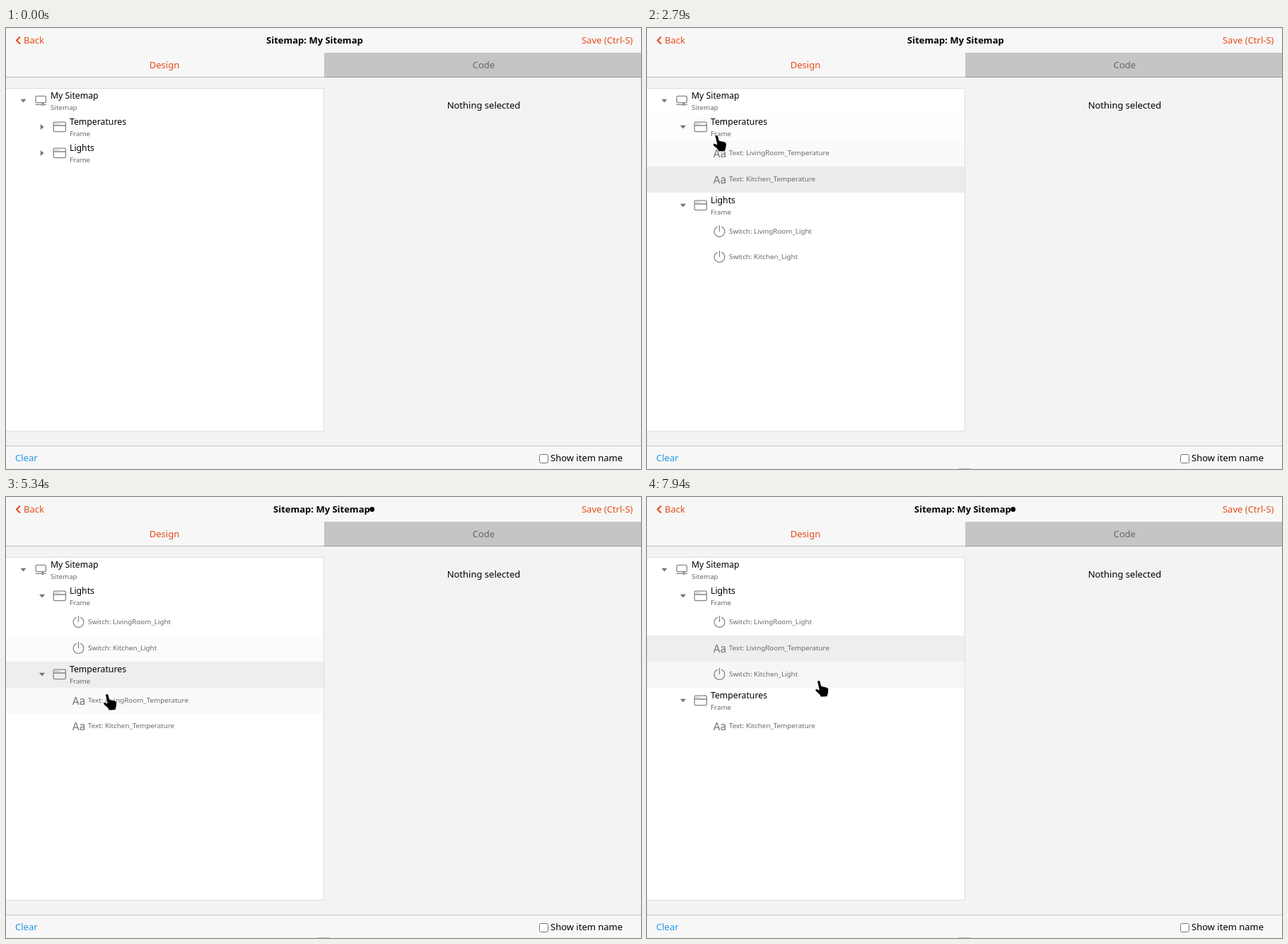
Animation, 898 px wide and 624 px high, one loop 7990 ms. Source, as an HTML page:

```html
<!DOCTYPE html>
<html lang="en">
<head>
<meta charset="utf-8">
<title>Sitemap editor</title>
<style>
html, body { margin: 0; width: 100%; height: 100%; overflow: hidden; background: #f3f3f3; }
svg { display: block; }
text { font: 13px "Noto Sans", "Open Sans", sans-serif; }
.name { font-size: 12.25px; }
.sub { font-size: 9.8px; fill: #6a6a6a; }
.aa { font: 15px Inter, Roboto, sans-serif; fill: #777; }
.bold { font-weight: 600; }
.accent { fill: #e64a19; }
.icon { fill: none; stroke: #858585; stroke-width: 1.3; stroke-linecap: round; }
.caret { fill: #737373; }
</style>
</head>
<body>
<svg width="898" height="624" viewBox="0 0 898 624">
  <rect width="898" height="624" fill="#f3f3f3"/>
  <rect width="898" height="70" fill="#f7f7f7"/>
  <rect x="450" y="35" width="448" height="35" fill="#c5c5c5"/>
  <rect y="69" width="450" height="1" fill="#bdbdbd"/>
  <rect x="450" y="69" width="448" height="1" fill="#969696"/>
  <path d="M20 12.5l-5 5 5 5" fill="none" stroke="#e64a19" stroke-width="2.1"/>
  <text class="accent" x="25" y="22">Back</text>
  <text class="bold" id="title" x="368" y="22">Sitemap: My Sitemap</text>
  <circle id="dirty" cx="517.7" cy="17.5" r="3.4"/>
  <text class="accent" x="886.5" y="22" text-anchor="end">Save (Ctrl-S)</text>
  <text class="accent" x="224" y="57" text-anchor="middle">Design</text>
  <text x="675.5" y="57" text-anchor="middle" fill="#666">Code</text>
  <text x="675.5" y="114" text-anchor="middle">Nothing selected</text>
  <path d="M0 85.5H449.5V570.5H0" fill="#fff" stroke="#dedede"/>
  <rect y="591" width="898" height="33" fill="#f7f7f7"/>
  <rect y="591" width="898" height="1" fill="#c6c6c6"/>
  <text x="13" y="613" fill="#2196e8">Clear</text>
  <rect x="754.5" y="603.5" width="12" height="12" rx="2" fill="#fff" stroke="#767676"/>
  <text x="770" y="613">Show item name</text>
  <rect id="grip" x="440" y="623" width="18" height="1" fill="#c0c0c0"/>

  <g transform="translate(0 85)">
    <path class="caret" d="M20.5 15.8h8l-4 4.7z"/>
    <g class="icon">
      <rect x="42" y="11.3" width="14.4" height="9.4" rx="1.6"/>
      <path d="M42 23.3H50M54 23.3H56.5M52 21V22"/>
      <circle cx="52" cy="23.3" r="1.3"/>
    </g>
    <text class="name" x="63" y="15">My Sitemap</text>
    <text class="sub" x="63" y="30.5">Sitemap</text>
  </g>
  <g id="hovers"></g>
  <g id="rows"></g>
  <g id="ghosts" opacity=".75"></g>
  <path id="hand" stroke="#fff" stroke-width=".8" d="M-2.2 1.6C-2.3-.5 1.3-.8 2 1.3L3.6 7.4 11 9.2Q13.9 10 13.8 13L13.2 18Q12.3 20 12 22.6L2.5 23 1.5 20-4.6 14.6Q-6 12-3.5 11.4L.4 13Z"/>
  <g id="noDrop">
    <circle r="9" fill="#fff" stroke="#d40a0a" stroke-width="2.2"/>
    <path d="M-6.8 4.6L6.8-4.6" stroke="#d40a0a" stroke-width="2.6"/>
  </g>
</svg>
<script>
const LOOP = 7990, TOP = 122.3, PITCH = 36.83, FADE = 270, SWAP = 160;
const $ = id => document.getElementById(id);
const show = (el, on) => el.style.display = on ? '' : 'none';
const move = (el, x, y) => el.setAttribute('transform', `translate(${x} ${y})`);

const items = {
  T: ['frame', 'Temperatures'],
  a: ['text', 'Text: LivingRoom_Temperature'],
  b: ['text', 'Text: Kitchen_Temperature'],
  L: ['frame', 'Lights'],
  c: ['switch', 'Switch: LivingRoom_Light'],
  d: ['switch', 'Switch: Kitchen_Light']
};
const ids = Object.keys(items);

// [start, row order, slides into place]
const layouts = [
  [0, 'TL'], [1200, 'TabL'], [1850, 'TabLcd'],
  [3700, 'LcdTab', true], [6480, 'LcadTb', true]
];

// Pointer path: [time, x, y]
const path = [
  [60, 449, 612], [500, 210, 330], [900, 45, 137], [1350, 45, 137],
  [1700, 47, 248], [2310, 47, 248], [2510, 62, 234], [2720, 80, 198],
  [2790, 98.5, 152], [2900, 102, 138], [3010, 102, 140], [3320, 95.5, 251],
  [3520, 95.5, 251], [3790, 168.5, 158], [4040, 165.5, 130], [4610, 165.5, 130],
  [5400, 141, 291], [5840, 141, 291], [6160, 210, 249], [6640, 226, 217],
  [6790, 228, 215], [7610, 228, 215], [7860, 238, 233], [7940, 243, 260]
];

const drags = [
  { from: 3520, to: 4180, rows: 'Lcd', dx: 95.5, dy: 18 },
  { from: 5840, to: 7060, rows: 'a', dx: 141, dy: 22 }
];

const icons = {
  frame: '<g class="icon"><rect x="67.2" y="11.2" width="17.2" height="13.4" rx="1.6"/><path d="M67.5 16H84M69.7 13.7h.1M72 13.7h.1M74.3 13.7h.1"/></g>',
  text: '<text class="aa" x="93.5" y="23.5">Aa</text>',
  switch: '<path class="icon" d="M99.3 11.4A7.4 7.4 0 1 0 105.7 11.4M102.5 9.5V17.5"/>'
};

function rowMarkup(id) {
  const [kind, label] = items[id];
  if (kind == 'frame') return `<path class="caret" d="M47 15.8h8l-4 4.7z"/>${icons.frame}
    <text class="name" x="90" y="15">${label}</text><text class="sub" x="90" y="30.5">Frame</text>`;
  const caret = kind == 'text' ? '<path class="caret" d="M74 15.8h8l-4 4.7z"/>' : '';
  return `${caret}${icons[kind]}<text class="sub" x="116" y="21.3">${label}</text>`;
}

function add(parent, markup) {
  const g = document.createElementNS('http://www.w3.org/2000/svg', 'g');
  g.innerHTML = markup;
  return parent.appendChild(g);
}

const rows = {}, hovers = {};
for (const id of ids) {
  hovers[id] = add($('hovers'), `<rect width="449" height="37"/>
    <rect x="40" y="7" width="22" height="22" rx="4"/>`);
  rows[id] = add($('rows'), rowMarkup(id));
}
for (const drag of drags) {
  drag.ghost = add($('ghosts'), '<rect width="450" height="36.5" opacity=".1"/>');
  [...drag.rows].forEach((id, i) => {
    const row = add(drag.ghost, rowMarkup(id));
    if (items[id][0] == 'text') row.querySelector('.caret').remove();
    move(row, 0, Math.round(i * PITCH));
  });
}

function pointer(t) {
  const i = path.findIndex(p => p[0] > t);
  if (i < 0) return path.at(-1).slice(1);
  if (!i) return path[0].slice(1);
  const [t0, x0, y0] = path[i - 1], [t1, x1, y1] = path[i];
  const k = (t - t0) / (t1 - t0);
  return [x0 + (x1 - x0) * k, y0 + (y1 - y0) * k];
}

const layoutAt = t => layouts.findLastIndex(l => l[0] <= t);

function slot(id, t) {
  const n = layoutAt(t), [start, order, slides] = layouts[n];
  const to = order.indexOf(id);
  if (!slides) return to;
  const from = layouts[n - 1][1].indexOf(id);
  return from + (to - from) * Math.min(1, (t - start) / SWAP);
}

// Row under the pointer; while dragging the browser keeps it on fixed rows
function hit(t) {
  if (t < 60) return {};
  const [first, second] = drags;
  if (t >= first.from && t < first.to) return { id: t < 3550 ? 'b' : t > 3790 ? 'L' : '' };
  if (t >= second.from && t < second.to) return { id: 'a' };
  const [x, y] = pointer(t);
  const id = x < 449 ? layouts[layoutAt(t)][1][Math.floor((y - TOP) / PITCH)] : '';
  return { id, toggle: x > 39 && x < 63 && 'TL'.includes(id) };
}

function draw(t) {
  const row = {}, toggle = {}, N = 27;
  for (let i = 0; i < N; i++) {
    const h = hit(t - FADE * i / N);
    if (!h.id) continue;
    row[h.id] = (row[h.id] || 0) + .1 / N;
    if (h.toggle) toggle[h.id] = (toggle[h.id] || 0) + .1 / N;
  }
  const drag = drags.find(d => t >= d.from && t < d.to);
  const order = layouts[layoutAt(t)][1];
  for (const id of ids) {
    const pos = slot(id, t), y = Math.round(TOP + pos * PITCH);
    for (const el of [rows[id], hovers[id]]) {
      show(el, pos >= 0);
      move(el, 0, y);
    }
    const [band, button] = hovers[id].children;
    band.setAttribute('opacity', row[id] || 0);
    button.setAttribute('opacity', toggle[id] || 0);
    const caret = rows[id].querySelector('.caret');
    if (items[id][0] == 'text') show(caret, drag);
    if (items[id][0] == 'frame') {
      const open = order.includes(id == 'T' ? 'b' : 'd');
      caret.setAttribute('transform', open ? '' : 'rotate(-90 51 18)');
    }
  }
  const [x, y] = pointer(t);
  for (const d of drags) {
    show(d.ghost, d == drag);
    move(d.ghost, Math.round(x - d.dx), Math.round(y - d.dy));
  }
  show($('hand'), t >= 60 && !drag);
  show($('noDrop'), drag);
  move($('hand'), x, y);
  move($('noDrop'), x, y);
  show($('grip'), t >= 60);
  const dirty = t >= drags[0].to;
  show($('dirty'), dirty);
  $('title').setAttribute('x', dirty ? 378 : 368);
}

function tick() {
  draw(performance.now() % LOOP);
  requestAnimationFrame(tick);
}
tick();
</script>
</body>
</html>
```
